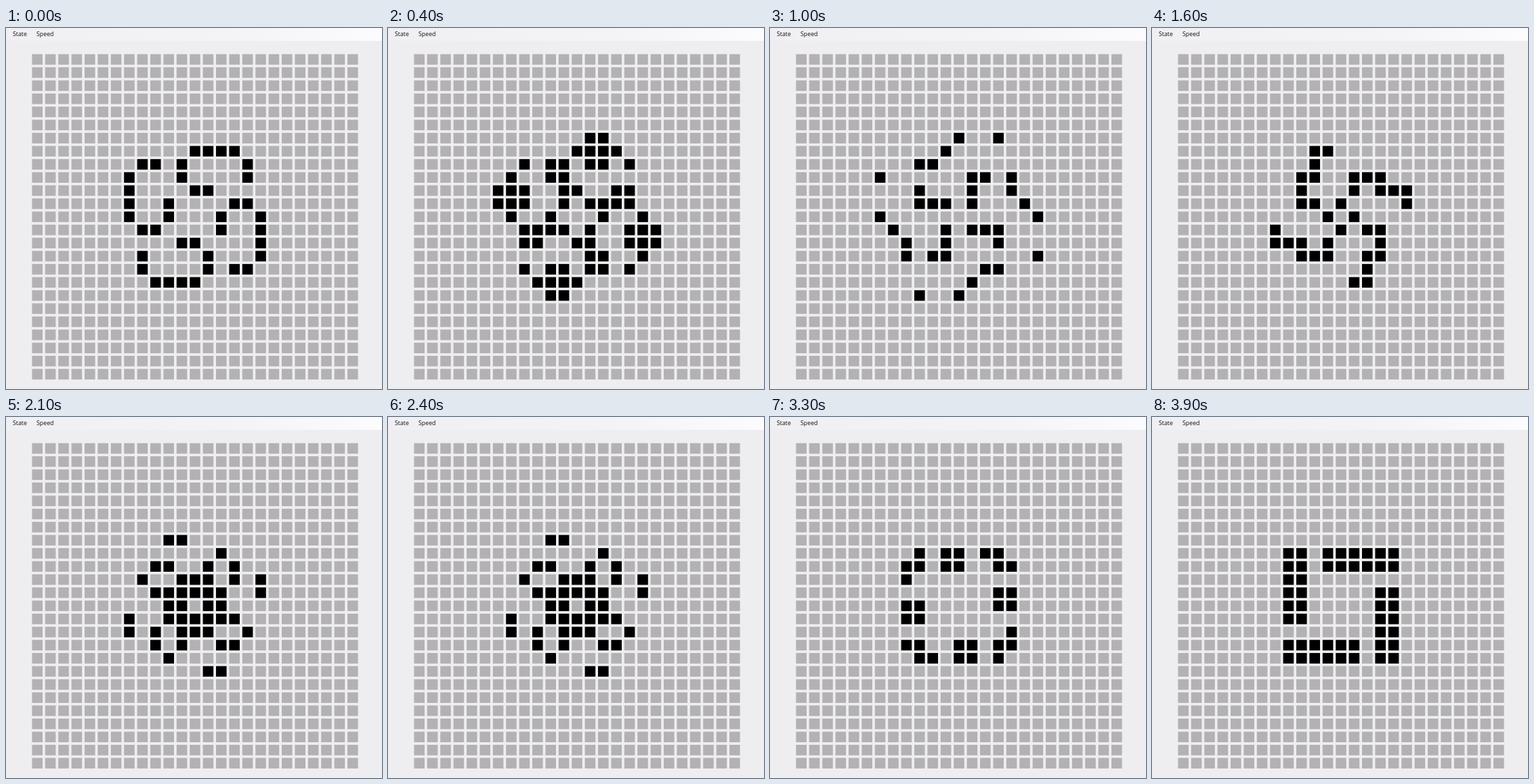
Recreate the animation shown at these times as an HTML page with a canvas. Size 555 by 534 pixels, loop 4300 ms.

```html
<!DOCTYPE html>
<html lang="en">
<head>
<meta charset="utf-8">
<title>Game of Life</title>
<style>
  html, body { margin: 0; width: 100%; height: 100%; overflow: hidden; background: #eeedf0; }
  canvas { position: absolute; left: 0; top: 0; }
  nav {
    position: absolute; left: 0; top: 0; width: 555px; height: 19px;
    background: linear-gradient(90deg, #f0eff3, #f4f3f6 60%, #fcfbfe);
    font: 8.8px/19px "Open Sans", "Noto Sans", sans-serif; color: #111;
  }
  nav span { position: absolute; top: 0; }
</style>
</head>
<body>
<canvas width="555" height="534"></canvas>
<nav><span style="left:10px">State</span><span style="left:45px">Speed</span></nav>
<script>
const SIZE = 25, PITCH = 19.4, CELL = 15.6, LEFT = 38.4, TOP = 38.7;
const LOOP = 4300;
const CHANGES = [400, 1000, 1600, 2100, 2700, 3300, 3900];
const ctx = document.querySelector('canvas').getContext('2d');

const emptyGrid = () => Array.from({ length: SIZE }, () => Array(SIZE).fill(0));

// Kok's galaxy: a 6 by 2 block repeated in four quarter turns.
function galaxy() {
  const grid = emptyGrid();
  for (let x = -1; x <= 4; x++) {
    for (let y = -4; y <= -3; y++) {
      let [dx, dy] = [x, y];
      for (let turn = 0; turn < 4; turn++) {
        grid[12 + dy][12 + dx] = 1;
        [dx, dy] = [-dy, dx];
      }
    }
  }
  return grid;
}

function nextGeneration(grid) {
  return grid.map((row, y) => row.map((alive, x) => {
    let sum = -alive;
    for (let dy = -1; dy <= 1; dy++) {
      for (let dx = -1; dx <= 1; dx++) sum += grid[y + dy]?.[x + dx] ?? 0;
    }
    return sum === 3 || (alive && sum === 2) ? 1 : 0;
  }));
}

const generations = [nextGeneration(galaxy())];
while (generations.length < 8) generations.push(nextGeneration(generations.at(-1)));

function draw(grid) {
  ctx.fillStyle = '#eeedf0';
  ctx.fillRect(0, 0, 555, 534);
  grid.forEach((row, y) => row.forEach((alive, x) => {
    ctx.fillStyle = alive ? '#000' : '#b3b1b4';
    ctx.fillRect(LEFT + x * PITCH, TOP + y * PITCH, CELL, CELL);
  }));
}

const start = performance.now();
function frame() {
  const time = (performance.now() - start) % LOOP;
  draw(generations[CHANGES.filter(change => change <= time).length]);
  requestAnimationFrame(frame);
}
frame();
</script>
</body>
</html>
```
